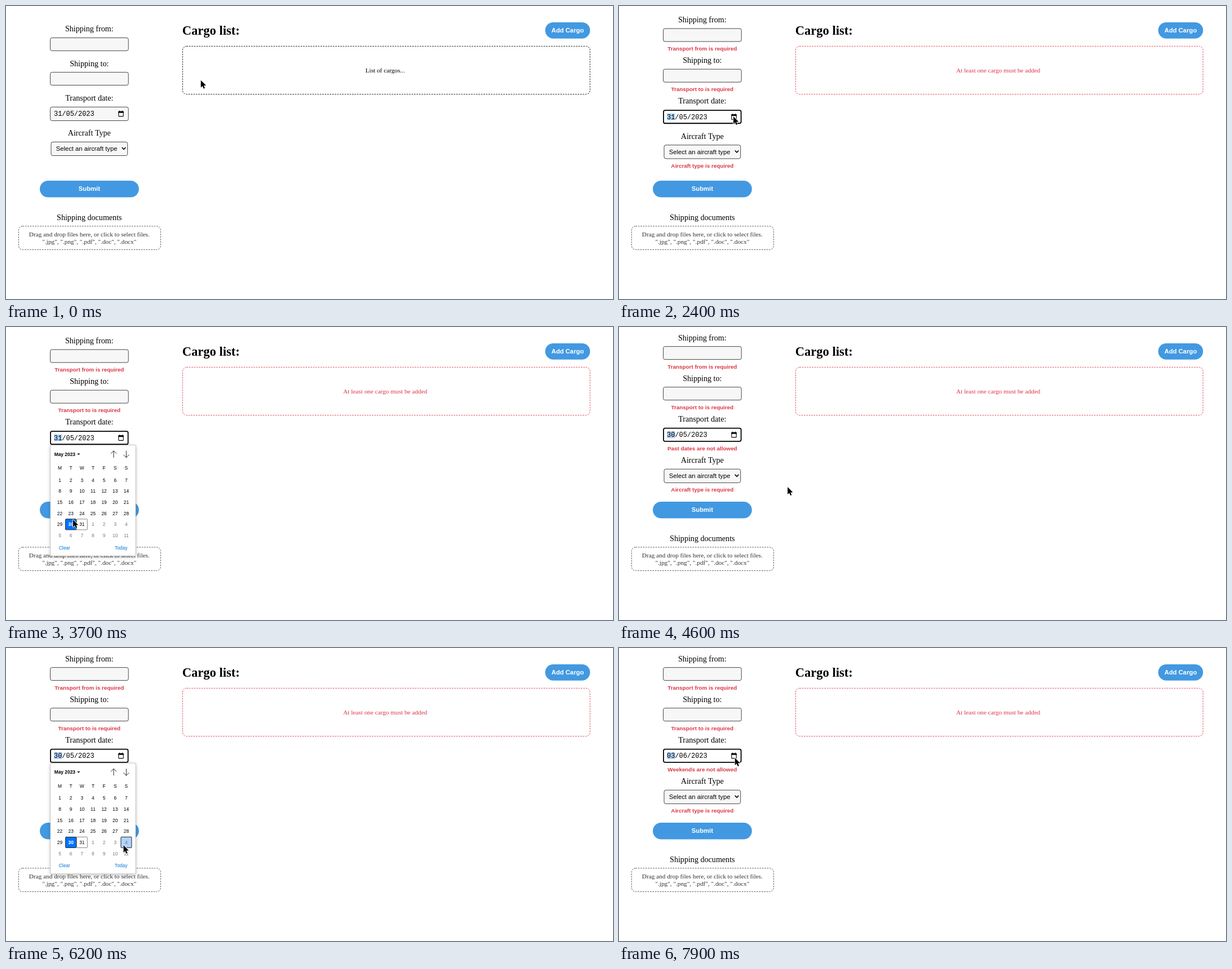
An HTML page with a canvas for the animation above (8000 ms loop, 1077x520 px).

```html
<!DOCTYPE html>
<html lang="en">
<head>
<meta charset="utf-8">
<title>Cargo form</title>
<style>
  html, body { margin: 0; width: 100%; height: 100%; overflow: hidden; background: #fff; }
  canvas { display: block; width: 1077px; height: 520px; }
</style>
</head>
<body>
<canvas id="stage"></canvas>
<script>
const W = 1077, H = 520, LOOP = 8000, STEP = 100;
const SERIF = '"Liberation Serif", "Times New Roman", serif';
const SANS = '"Liberation Sans", Arial, sans-serif';
const MONO = '"Liberation Mono", "Courier New", monospace';
const BLUE = '#4299e1', RED = '#dc3545', INK = '#333', LINK = '#0074d9';
const FORM_X = 147.8, TODAY = 30;

const canvas = document.getElementById('stage');
const ctx = canvas.getContext('2d');
const dpr = window.devicePixelRatio || 1;
canvas.width = Math.round(W * dpr);
canvas.height = Math.round(H * dpr);

// Each move eases from the previous place; bend bows it sideways
const MOVES = [
  { from: 100, to: 700, x: 178, y: 325.3 },
  { from: 1600, to: 1900, x: 209, y: 194.5 },
  { from: 2100, to: 2400, x: 203, y: 196 },
  { from: 2600, to: 3500, x: 119, y: 342 },
  { from: 3800, to: 4200, x: 310, y: 295 },
  { from: 4500, to: 5000, x: 205.7, y: 190 },
  { from: 5400, to: 5900, x: 180, y: 346, bend: -25 },
  { from: 5900, to: 6200, x: 208.5, y: 350, bend: 10 },
  { from: 6300, to: 6500, x: 193.5, y: 348.5 },
  { from: 7100, to: 7900, x: 205.7, y: 195 }
];

function cursorAt(t) {
  let x = 345.7, y = 131.7;
  for (const m of MOVES) {
    if (t <= m.from) break;
    const u = Math.min(1, (t - m.from) / (m.to - m.from));
    const e = u * u * (3 - 2 * u);
    const dx = m.x - x, dy = m.y - y;
    const bow = (m.bend || 0) * Math.sin(Math.PI * e) / Math.hypot(dx, dy);
    x += dx * e - dy * bow;
    y += dy * e + dx * bow;
  }
  return { x, y };
}

function text(str, x, y, size, family, color = '#000', weight = '', align = 'center') {
  ctx.font = `${weight} ${size}px ${family}`;
  ctx.fillStyle = color;
  ctx.textAlign = align;
  ctx.fillText(str, x, y + size * 0.345);
}

function box(x, y, w, h, r, fill, stroke, line = 0.9, dash = []) {
  ctx.beginPath();
  ctx.roundRect(x, y, w, h, r);
  if (fill) { ctx.fillStyle = fill; ctx.fill(); }
  if (stroke) {
    ctx.strokeStyle = stroke;
    ctx.lineWidth = line;
    ctx.setLineDash(dash);
    ctx.stroke();
    ctx.setLineDash([]);
  }
}

function line(points, width) {
  ctx.beginPath();
  points.forEach(([x, y]) => ctx.lineTo(x, y));
  ctx.strokeStyle = '#000';
  ctx.lineWidth = width;
  ctx.stroke();
}

const dashed = (x, y, w, h, color) => box(x, y, w, h, 7, null, color, 0.88, [2.64, 1.76]);
const control = (x, y, w, h) => box(x, y, w, h, 3.2, '#f7f7f7', INK);
const label = (str, y) => text(str, FORM_X, y, 14.1, SERIF);
const warn = (str, y) => text(str, FORM_X, y, 9.85, SANS, RED, 'bold');

function button(str, x, y, w, h) {
  box(x, y, w, h, h / 2, BLUE);
  text(str, x + w / 2, y + h / 2 - 0.4, 11.25, SANS, '#fff', 'bold');
}

function calendarIcon(x, y) {
  box(x - 4.2, y - 3.8, 8.4, 8.6, 0.8, null, '#000', 1.1);
  ctx.fillStyle = '#000';
  ctx.fillRect(x - 4.6, y - 4.2, 9.2, 2.8);
  ctx.fillRect(x - 3.1, y - 5.4, 1.2, 1.6);
  ctx.fillRect(x + 1.9, y - 5.4, 1.2, 1.6);
}

function dateField(y, date, focused) {
  const mid = y + 12.2;
  if (focused) {
    box(79, y + 0.7, 137.6, 23.2, 2.8, '#fff', '#000', 1.8);
    ctx.fillStyle = '#b0d3fa';
    ctx.fillRect(85, mid - 6, 14.6, 12);
  } else {
    control(78.5, y + 0.4, 138.7, 24.2);
  }
  text(date, 85, mid, 11.95, MONO, '#000', '', 'left');
  calendarIcon(204, mid);
}

// The form stays centred, so every error lifts its start by half a row
function layout(errors) {
  const row = 61.2, extra = 10.9;
  let y = 41 - errors.filter(Boolean).length * extra / 2;
  return errors.map((error, i) => {
    const top = y;
    y += row + (error ? extra : 0) + (i === 2 ? 1.2 : 0);
    return top;
  });
}

function form(s, rows) {
  const names = ['Shipping from:', 'Shipping to:', 'Transport date:', 'Aircraft Type'];
  rows.forEach((y, i) => {
    label(names[i], y - 0.5);
    if (i < 2) control(78.5, y + 15.4, 138.7, 23);
    if (s.errors[i]) warn(s.errors[i], y + (i < 2 ? 51 : 52));
  });
  const [, , date, type] = rows;
  dateField(date + 15.5, s.date, s.focused);
  control(80, type + 15.5, 135.7, 24.2);
  text('Select an aircraft type', 88.7, type + 27.5, 11.25, SANS, '#000', '', 'left');
  line([[205.7, type + 25.2], [209, type + 28.6], [212.3, type + 25.2]], 1.6);

  button('Submit', 60, 310, 175.8, 29.6);
  label('Shipping documents', 375.2);
  dashed(22.4, 390.8, 252, 41.6, '#444');
  text('Drag and drop files here, or click to select files.', FORM_X, 405, 11.25, SERIF, '#333');
  text('".jpg", ".png", ".pdf", ".doc", ".docx"', FORM_X, 418, 11.25, SERIF, '#333');
}

function cargo(bad) {
  const color = bad ? RED : '#000';
  text('Cargo list:', 312.8, 43.2, 22.5, SERIF, '#000', 'bold', 'left');
  button('Add Cargo', 956.7, 28.9, 79.6, 28.8);
  dashed(313.4, 71.4, 722.8, 85.2, color);
  text(bad ? 'At least one cargo must be added' : 'List of cargos...',
    672.7, 114.2, 11.25, SERIF, color);
}

function picker(top, picked, mouse) {
  const pitch = 19.65, size = 8.4;
  ctx.save();
  ctx.shadowColor = 'rgba(0,0,0,.3)';
  ctx.shadowBlur = 6 * dpr;
  ctx.shadowOffsetY = 1.5 * dpr;
  box(78.8, top + 0.3, 151.2, 196.4, 0, '#fff');
  ctx.restore();
  box(78.8, top + 0.3, 151.2, 196.4, 0, null, '#bfbfbf', 0.7);

  const head = top + 16.3;
  text('May 2023', 85.7, head, size, SANS, '#000', 'bold', 'left');
  ctx.beginPath();
  ctx.moveTo(126.2, head - 1.3);
  ctx.lineTo(131.4, head - 1.3);
  ctx.lineTo(128.8, head + 1.5);
  ctx.fill();
  [-1, 1].forEach(dir => {
    const x = 202.2 + 11.2 * dir, tip = head + 6 * dir;
    line([[x, head - 6 * dir], [x, tip]], 0.85);
    line([[x - 5, tip - 5 * dir], [x, tip], [x + 5, tip - 5 * dir]], 0.85);
  });

  [...'MTWTFSS'].forEach((d, c) => text(d, 95.5 + c * pitch, top + 41.1, size, SANS));
  for (let i = 0; i < 42; i++) {
    const x = 95.5 + (i % 7) * pitch;
    const y = top + 62.3 + Math.floor(i / 7) * pitch;
    const over = Math.max(Math.abs(mouse.x - x), Math.abs(mouse.y - y)) < pitch / 2;
    const cell = (fill, edge) => box(x - 9.5, y - 9.5, 19, 19, 0.8, fill, edge);
    const on = i === picked, next = i > TODAY;
    if (on) cell('#0075ff', '#101010');
    else if (over) cell('#b0d3fd', '#101010');
    else if (i === TODAY) cell(null, '#767676');
    text(next ? i - TODAY : i + 1, x, y + 0.2, size, SANS,
      on ? '#fff' : next ? '#757575' : '#000', on ? 'bold' : '');
  }
  text('Clear', 103.8, top + 182.4, size, SANS, LINK);
  text('Today', 204.2, top + 182.4, size, SANS, LINK);
}

function shape(path) {
  ctx.strokeStyle = '#fff';
  ctx.lineWidth = 1.5;
  ctx.lineJoin = 'round';
  ctx.stroke(path);
  ctx.fillStyle = '#000';
  ctx.fill(path);
}

function handPath() {
  const path = new Path2D();
  path.roundRect(-1.2, 0, 2.5, 9, 1.2);
  path.roundRect(-1.2, 4.4, 8, 7.8, 2);
  path.ellipse(-1.6, 8, 2.9, 1.3, 0.8, 0, 2 * Math.PI);
  return path;
}

const HAND = handPath();
const ARROW = new Path2D('M0 0V13L3 10.3 5.1 15 7.2 14.1 5.2 9.6 9.3 9.4Z');

function cursor({ x, y }, hand) {
  ctx.save();
  ctx.translate(x, y);
  shape(hand ? HAND : ARROW);
  if (hand) {
    ctx.fill(HAND);
    ctx.fillStyle = '#fff';
    for (let f = 1.5; f < 6; f += 1.9) ctx.fillRect(f, 5, 0.5, 2.2);
  }
  ctx.restore();
}

function stateAt(t) {
  const sent = t >= 1000;
  const dateError = t < 3900 ? '' : t < 7000 ? 'Past dates are not allowed' : 'Weekends are not allowed';
  return {
    sent,
    errors: [
      sent && 'Transport from is required',
      sent && 'Transport to is required',
      dateError,
      sent && 'Aircraft type is required'
    ],
    focused: t >= 2300,
    date: t < 3900 ? '31/05/2023' : t < 7000 ? '30/05/2023' : '03/06/2023',
    open: (t >= 2700 && t < 3900) || (t >= 5300 && t < 7000),
    picked: t < 3700 ? TODAY : t < 6900 ? TODAY - 1 : TODAY + 3
  };
}

function draw(time) {
  const t = Math.floor((time % LOOP) / STEP) * STEP;
  const s = stateAt(t), mouse = cursorAt(t), rows = layout(s.errors);
  ctx.setTransform(dpr, 0, 0, dpr, 0, 0);
  ctx.fillStyle = '#fff';
  ctx.fillRect(0, 0, W, H);
  form(s, rows);
  cargo(s.sent);
  if (s.open) picker(rows[2] + 40.6, s.picked, mouse);
  const onSubmit = mouse.x > 60 && mouse.x < 236 && mouse.y > 310 && mouse.y < 339.6;
  cursor(mouse, onSubmit && !s.open);
}

const start = performance.now();
function tick() {
  draw(performance.now() - start);
  requestAnimationFrame(tick);
}
tick();
</script>
</body>
</html>
```
